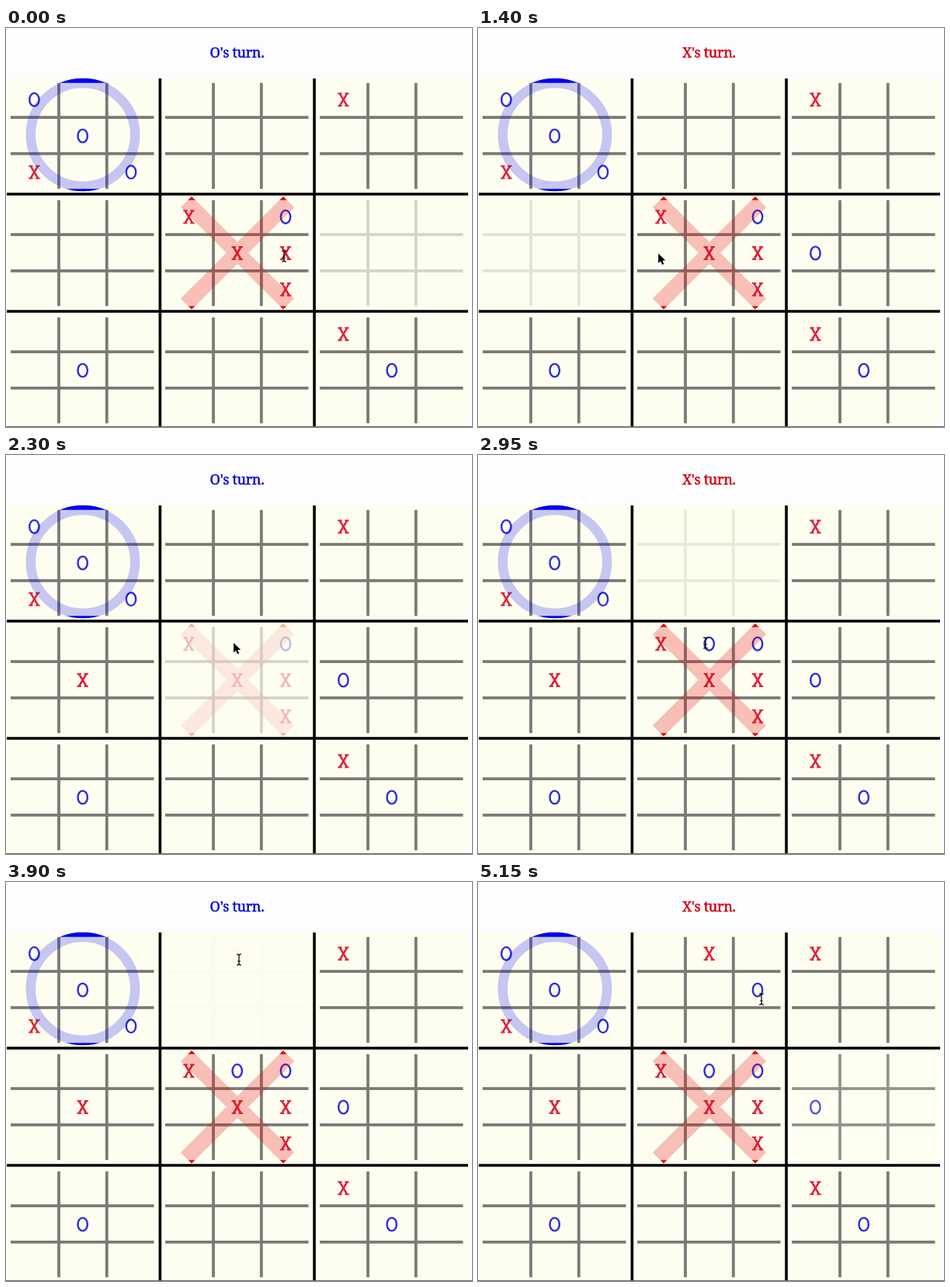
These frames come from a looping animation (600 by 514 pixels, 5.2 s). An HTML page with a canvas:

```html
<!DOCTYPE html>
<html lang="en">
<head>
<meta charset="utf-8">
<title>Nested noughts and crosses</title>
<style>
html, body { margin: 0; width: 100%; height: 100%; overflow: hidden; background: #fdfdff; }
canvas { display: block; }
</style>
</head>
<body>
<canvas id="stage" width="600" height="514"></canvas>
<script>
const ctx = document.getElementById('stage').getContext('2d');
const LOOP = 5200, TICK = 50, HALF_PULSE = 500;
const PAGE = '#fdfdff', IVORY = '#fefef0', GRID = '#7a7a76';
const INK = { X: '#e0203a', O: '#2c2ce0' };
const STRONG = { X: '#e00008', O: '#0000f0' };
const TITLE = { X: '#d20012', O: '#0a0ad8' };
const START = ['O...O.X.O', '', 'X', '', 'X.O.X...X', '', '....O', '', 'X...O'];
const WON = { 0: 'O', 4: 'X' };

// time, board, cell, player; the cell played names the next board
const MOVES = [
  [-200, 4, 5, 'X'], [820, 5, 3, 'O'], [1695, 3, 4, 'X'],
  [2380, 4, 1, 'O'], [3700, 1, 1, 'X'], [5075, 1, 5, 'O']
];

// time, x, y
const POINTER = [
  [0, 358, 294], [120, 358, 294], [720, 446, 291], [1100, 446, 291],
  [1620, 98, 290], [1850, 98, 290], [2250, 293, 242], [2980, 293, 242],
  [3450, 300, 100], [4300, 300, 100], [4900, 365, 151], [LOOP, 365, 151]
];

// CSS "ease": cubic-bezier(.25, .1, .25, 1)
function ease(x) {
  const bez = (a, b, s) => 3 * a * s * (1 - s) ** 2 + 3 * b * s * s * (1 - s) + s ** 3;
  let lo = 0, hi = 1;
  for (let i = 0; i < 24; i++) {
    const mid = (lo + hi) / 2;
    if (bez(0.25, 0.25, mid) < x) lo = mid; else hi = mid;
  }
  return bez(0.1, 1, lo);
}

function pulse(age) {
  const p = (age % (2 * HALF_PULSE)) / HALF_PULSE;
  return p < 1 ? 1 - ease(p) : ease(p - 1);
}

function stateAt(t) {
  const cells = START.map(s => s.padEnd(9, '.').split(''));
  let active = -1, since = 0, turn = 'O';
  for (const [time, board, cell, player] of MOVES) {
    if (time > t) break;
    cells[board][cell] = player;
    turn = player === 'X' ? 'O' : 'X';
    if (cell !== active) { active = cell; since = time; }
  }
  return { cells, active, turn, opacity: pulse(t - since) };
}

const origin = b => [199 * (b % 3), 151 * Math.floor(b / 3)];

function cellCentre(b, c) {
  const [x, y] = origin(b);
  return [x + 36.4 + 62.3 * (c % 3), y + 92.3 + 46.7 * Math.floor(c / 3)];
}

function line(...p) {
  ctx.beginPath();
  for (let i = 0; i < p.length; i += 2) ctx.lineTo(p[i], p[i + 1]);
  ctx.stroke();
}

function drawMark(kind, x, y) {
  ctx.save();
  ctx.translate(x, y);
  ctx.strokeStyle = INK[kind];
  if (kind === 'O') {
    ctx.lineWidth = 2.4;
    ctx.beginPath();
    ctx.ellipse(0, 0, 6.2, 8.4, 0, 0, Math.PI * 2);
    ctx.stroke();
  } else {
    ctx.lineWidth = 2.6;
    line(-4.8, -8, 4.8, 8);
    line(4.8, -8, -4.8, 8);
    ctx.lineWidth = 1.9;
    for (const sy of [-8, 8]) {
      line(-7.2, sy, -1.8, sy);
      line(1.8, sy, 7.2, sy);
    }
  }
  ctx.restore();
}

function bigMark(kind, x, y) {
  ctx.strokeStyle = STRONG[kind];
  if (kind === 'O') {
    ctx.lineWidth = 12.5;
    ctx.beginPath();
    ctx.ellipse(x + 99, y + 137.5, 67.2, 66.4, 0, 0, Math.PI * 2);
    ctx.stroke();
  } else {
    // both arms in one path, so the crossing is not darker
    ctx.lineWidth = 20;
    ctx.beginPath();
    ctx.moveTo(x + 33, y + 73);
    ctx.lineTo(x + 165, y + 204.5);
    ctx.moveTo(x + 165, y + 73);
    ctx.lineTo(x + 33, y + 204.5);
    ctx.stroke();
  }
}

// Solid outside the small table, pale inside it
function drawWin(kind, x, y) {
  const inside = [x + 6, y + 70.8, 184.5, 136.4];
  ctx.save();
  ctx.beginPath();
  ctx.rect(x, y + 64, 198, 151);
  ctx.rect(...inside);
  ctx.clip('evenodd');
  bigMark(kind, x, y);
  ctx.restore();
  ctx.save();
  ctx.beginPath();
  ctx.rect(...inside);
  ctx.clip();
  ctx.globalAlpha = kind === 'O' ? 0.22 : 0.25;
  bigMark(kind, x, y);
  ctx.restore();
}

function drawBoard(b, cells, opacity) {
  const [x, y] = origin(b);
  ctx.strokeStyle = GRID;
  ctx.lineWidth = 3.8;
  for (const dx of [68, 129.8]) line(x + dx, y + 70.8, x + dx, y + 207.2);
  for (const dy of [115.2, 161.8]) line(x + 6, y + dy, x + 190.5, y + dy);
  cells.forEach((kind, c) => {
    if (kind !== '.') drawMark(kind, ...cellCentre(b, c));
  });
  if (WON[b]) drawWin(WON[b], x, y);
  if (opacity < 1) {
    ctx.globalAlpha = 1 - opacity;
    ctx.fillStyle = IVORY;
    ctx.fillRect(x + 1, y + 65, 196, 148.5);
    ctx.globalAlpha = 1;
  }
}

function drawTitle(turn) {
  ctx.font = '18px "Noto Serif", "Liberation Serif", serif';
  ctx.textAlign = 'center';
  ctx.textBaseline = 'alphabetic';
  ctx.fillStyle = ctx.strokeStyle = TITLE[turn];
  ctx.lineWidth = 0.5;
  ctx.letterSpacing = '-0.3px';
  const text = turn + "'s turn.";
  ctx.fillText(text, 297.5, 37.5);
  ctx.strokeText(text, 297.5, 37.5);
}

function pointerAt(t) {
  let i = 1;
  while (i < POINTER.length - 1 && POINTER[i][0] <= t) i++;
  const [t0, x0, y0] = POINTER[i - 1], [t1, x1, y1] = POINTER[i];
  const p = (t - t0) / (t1 - t0), k = p * p * (3 - 2 * p);
  return [x0 + (x1 - x0) * k, y0 + (y1 - y0) * k];
}

function drawPointer(t, cells) {
  const [x, y] = pointerAt(t);
  const onText = cells.some((row, b) => row.some((kind, c) => {
    const [cx, cy] = cellCentre(b, c);
    return kind !== '.' && Math.abs(x - cx) < 10 && Math.abs(y - cy) < 18;
  }));
  ctx.save();
  ctx.translate(x, y);
  if (onText) {
    ctx.strokeStyle = '#111';
    ctx.lineWidth = 1.3;
    line(0, -6, 0, 6);
    line(-2.8, -7, -1.2, -6.8, 0, -5.6, 1.2, -6.8, 2.8, -7);
    line(-2.8, 7, -1.2, 6.8, 0, 5.6, 1.2, 6.8, 2.8, 7);
    line(-1.6, 2, 1.6, 2);
  } else {
    ctx.beginPath();
    for (const p of [[0, 0], [0, 12.5], [3, 9.8], [5, 14.6], [7.2, 13.6], [5.2, 9], [9.2, 9]]) ctx.lineTo(...p);
    ctx.closePath();
    ctx.strokeStyle = '#fff';
    ctx.lineWidth = 1.6;
    ctx.lineJoin = 'round';
    ctx.stroke();
    ctx.fillStyle = '#000';
    ctx.fill();
  }
  ctx.restore();
}

function draw(t) {
  const { cells, active, turn, opacity } = stateAt(t);
  ctx.fillStyle = PAGE;
  ctx.fillRect(0, 0, 600, 514);
  ctx.fillStyle = IVORY;
  ctx.fillRect(1, 65, 594, 449);
  cells.forEach((row, b) => drawBoard(b, row, b === active ? opacity : 1));
  ctx.strokeStyle = '#000';
  ctx.lineWidth = 3.6;
  for (const x of [198.4, 397]) line(x, 65, x, 514);
  for (const y of [214, 365]) line(1, y, 595, y);
  ctx.fillStyle = '#6a6a6a';
  ctx.fillRect(0, 513, 600, 1);
  drawTitle(turn);
  drawPointer(t, cells);
}

let begin = null;
function frame(now) {
  if (begin === null) begin = now;
  draw(Math.floor(((now - begin) % LOOP) / TICK) * TICK);
  requestAnimationFrame(frame);
}
draw(0);
requestAnimationFrame(frame);
</script>
</body>
</html>
```
